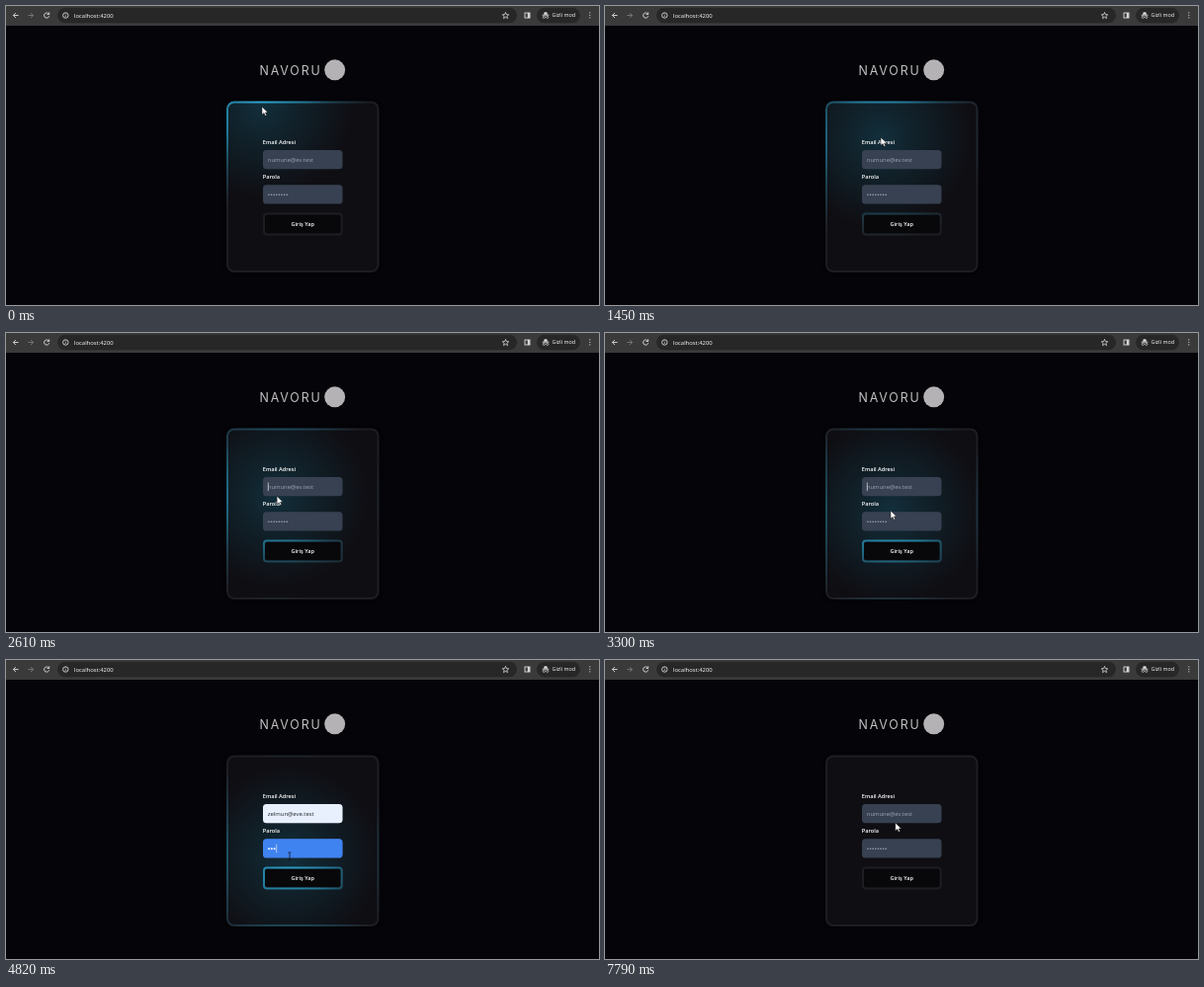
These frames come from a looping animation (600x303 px, 7820 ms). An HTML page:

```html
<!DOCTYPE html>
<html lang="tr">
<head>
<meta charset="utf-8">
<title>Giriş</title>
<style>
  html, body { margin: 0; width: 100%; height: 100%; overflow: hidden; background: #050409; }
  svg { display: block; width: 600px; height: 303px; }
  text { font-family: "Open Sans", "Noto Sans", sans-serif; font-size: 5.9px; fill: #fff; }
  .label { font-size: 5.6px; font-weight: 600; }
  .hint { fill: #9ca3af; }
  .brand { font-family: Inter, sans-serif; font-size: 12.4px; font-weight: 400; letter-spacing: 1.9px; fill: #c3c0c2; }
  .icon { fill: none; stroke: #dcdcdc; stroke-width: .9; }
  .field { fill: #374151; }
  .hover { fill: #3f83f1; }
  .edge { fill: none; stroke: #1e1d22; stroke-width: 2; }
  .lit { fill: none; stroke: url(#rim); stroke-width: 2; }
</style>
</head>
<body>
<svg viewBox="0 0 600 303">
  <defs>
    <radialGradient id="rim" gradientUnits="userSpaceOnUse" r="108">
      <stop offset="0" stop-color="#2cabd8"/>
      <stop offset=".4" stop-color="#2296bd" stop-opacity=".75"/>
      <stop offset=".65" stop-color="#1c7c9c" stop-opacity=".4"/>
      <stop offset="1" stop-color="#1c7c9c" stop-opacity="0"/>
    </radialGradient>
    <radialGradient id="haze" gradientUnits="userSpaceOnUse" r="92">
      <stop offset="0" stop-color="#155064" stop-opacity=".5"/>
      <stop offset=".5" stop-color="#144656" stop-opacity=".28"/>
      <stop offset="1" stop-color="#144656" stop-opacity="0"/>
    </radialGradient>
    <filter id="soft" x="-20%" y="-20%" width="140%" height="140%"><feGaussianBlur stdDeviation="2"/></filter>
  </defs>

  <rect width="600" height="303" fill="#050409"/>

  <g id="toolbar">
    <rect width="600" height="20" fill="#3a3a3b"/>
    <rect x="52" y="1.8" width="465" height="15.4" rx="7.7" fill="#272728"/>
    <rect x="537" y="1.8" width="44" height="15.4" rx="7.7" fill="#272728"/>
    <g class="icon">
      <path d="M12.6 9.5H7.4M9.9 7 7.4 9.5 9.9 12"/>
      <path d="M22.4 9.5H27.6M25.1 7 27.6 9.5 25.1 12" stroke="#7c7c7c"/>
      <path d="M43.3 8A2.6 2.6 0 1 0 43.7 10.2M43.7 6.4V8.5H41.6"/>
      <circle cx="60.3" cy="9.5" r="2.7"/>
      <path d="M60.3 9.2V11M60.3 7.7V8.4" stroke-width=".7"/>
      <path d="M505.5 6.4 506.4 8.6 508.7 8.8 506.9 10.3 507.5 12.6 505.5 11.3 503.5 12.6 504.1 10.3 502.3 8.8 504.6 8.6Z" stroke-width=".8"/>
      <rect x="525" y="7" width="5" height="5"/>
      <path d="M528.8 7V12" stroke-width="2"/>
      <path d="M542.6 9.2H549.4"/>
      <circle cx="544.3" cy="11.3" r="1.1" stroke-width=".7"/>
      <circle cx="547.7" cy="11.3" r="1.1" stroke-width=".7"/>
    </g>
    <path d="M544 8.8 544.7 6.2H547.3L548 8.8Z" fill="#dcdcdc"/>
    <path d="M590.8 6.8V12.4" stroke="#dcdcdc" stroke-width="1.2" stroke-linecap="round" stroke-dasharray="0 2.5"/>
    <text x="69" y="11.6">localhost:4200</text>
    <text x="552.5" y="11.4" font-size="5.4" style="font-size:5.4px">Gizli mod</text>
  </g>

  <g id="page">
    <text class="brand" x="256.5" y="69.6">NAVORU</text>
    <circle cx="332.7" cy="64.8" r="10.5" fill="#b5b2b5"/>

    <rect x="223" y="97" width="154" height="173" rx="8" fill="#000" opacity=".6" filter="url(#soft)"/>
    <rect x="224" y="97.5" width="152.5" height="171.5" rx="7" fill="#0f0e13"/>
    <rect class="glow" x="224" y="97.5" width="152.5" height="171.5" rx="7" fill="url(#haze)"/>
    <rect class="edge" x="224" y="97.5" width="152.5" height="171.5" rx="7"/>
    <rect class="glow lit" x="224" y="97.5" width="152.5" height="171.5" rx="7"/>

    <text class="label" x="259.8" y="140.2">Email Adresi</text>
    <rect class="field" x="260" y="146" width="80.5" height="19.3" rx="3.6"/>
    <rect class="hover" id="mailHover" x="260" y="146" width="80.5" height="19.3" rx="3.6"/>
    <rect id="filled" x="260" y="146" width="80.5" height="19.3" rx="3.6" fill="#e8f0fe"/>
    <text id="mail" x="264.8" y="157.7"></text>

    <text class="label" x="259.8" y="175.4">Parola</text>
    <rect class="field" x="260" y="181.2" width="80.5" height="19.3" rx="3.6"/>
    <rect class="hover" id="passHover" x="260" y="181.2" width="80.5" height="19.3" rx="3.6"/>
    <g id="dots"></g>
    <path id="caret" stroke="#e5e7eb" stroke-width=".7"/>

    <rect id="ring" x="258.7" y="208.3" width="83" height="25.4" rx="5" fill="none" stroke="#1d4c9c" stroke-width="2.4"/>
    <rect x="261" y="210.5" width="78.7" height="21" rx="3" fill="#08080b"/>
    <rect class="edge" x="261" y="210.5" width="78.7" height="21" rx="3"/>
    <rect class="glow lit" x="261" y="210.5" width="78.7" height="21" rx="3"/>
    <rect class="hover" id="btnHover" x="260" y="209.5" width="80.7" height="23" rx="4"/>
    <text class="label" x="300.2" y="223.1" text-anchor="middle">Giriş Yap</text>
  </g>

  <g id="cursor">
    <path id="arrow" d="M0 0V8.2L2 6.4 3.3 9.2 4.7 8.6 3.4 5.9H6Z" fill="#fff" stroke="#111" stroke-width=".5"/>
    <path id="beam" d="M-1.5-4H-.4L0-3.6.4-4H1.5M0-3.6V3.6M-1.5 4H-.4L0 3.6.4 4H1.5" fill="none" stroke="#10131a" stroke-width=".8"/>
    <path id="hand" d="M-.8.6Q0-.4.8.6V3.6L1.8 3.3 2.3 4 3.2 3.8 3.7 4.5 4.6 4.6V7.6L3.7 10H-.8L-3.2 6.6Q-3.4 5.4-2 5.7L-.8 6.8Z" fill="#fff" stroke="#111" stroke-width=".5"/>
  </g>
</svg>

<script>
const LOOP = 7820, LEAVE = 6390, RETURN = 7390;
const HINT = "numune@ev.test", MAIL = "zelmun@eve.test";
const $ = id => document.getElementById(id);
const show = (el, on) => { el.style.display = on ? "" : "none"; };
const clamp = v => Math.max(0, Math.min(1, v));
const fade = (t, from, to) => clamp((t - from) / 150) * (1 - clamp((t - to) / 150));
const within = (t, from, to) => t >= from && t < to;

// pointer keys: time, x, y
const path = [
  [0, 259, 102], [250, 315, 105], [450, 350, 135], [650, 362, 200], [790, 350, 246],
  [940, 334, 256], [1150, 262, 254], [1350, 246, 180], [1500, 298, 118], [1640, 338, 130],
  [1800, 308, 152], [1970, 288.5, 170], [2250, 287, 160], [2420, 285, 157], [2700, 271, 170],
  [2950, 279, 182], [3210, 289, 180], [3500, 289, 180], [3900, 287, 199], [5270, 287, 199],
  [5500, 316, 206], [5750, 327, 221], [6030, 301.5, 219], [6700, 301.5, 219], [6970, 293.8, 165],
  [LOOP, 293.8, 165]
];

function slope(i, axis) {
  const a = path[i - 1], b = path[i], c = path[i + 1];
  if (!a || !c) return 0;
  const still = (p, q) => p[1] === q[1] && p[2] === q[2];
  return still(a, b) || still(b, c) ? 0 : (c[axis] - a[axis]) / (c[0] - a[0]);
}

function pointer(t) {
  let i = 0;
  while (i < path.length - 2 && t >= path[i + 1][0]) i++;
  const a = path[i], b = path[i + 1], span = b[0] - a[0], u = (t - a[0]) / span;
  const ease = u * u * (3 - 2 * u);
  return [1, 2].map(k => a[k] + (b[k] - a[k]) * ease
    + span * u * (1 - u) * ((1 - u) * slope(i, k) - u * slope(i + 1, k)));
}

const dots = Array.from({ length: 8 }, () => {
  const dot = document.createElementNS("http://www.w3.org/2000/svg", "circle");
  dot.setAttribute("cy", 191.2);
  return $("dots").appendChild(dot);
});
const glows = document.querySelectorAll(".glow");

function drawMail(t, back) {
  const typed = t < 4050 || back ? 0 : t < 4450 ? Math.min(6, 1 + Math.floor((t - 4050) / 55)) : MAIL.length;
  const done = typed === MAIL.length;
  const mail = $("mail");
  mail.textContent = typed ? MAIL.slice(0, typed) : HINT;
  mail.style.fill = done ? "#24262b" : typed ? "#fff" : "#9ca3af";
  $("mailHover").style.opacity = back ? 0 : fade(t, 1720, 2440);
  show($("filled"), done);
  return typed;
}

function drawPass(t, back) {
  const typed = t < 4690 || back ? 0 : Math.min(6, 1 + Math.floor((t - 4690) / 65));
  dots.forEach((dot, i) => {
    show(dot, !typed || i < typed);
    dot.setAttribute("cx", 266 + i * (typed ? 2.8 : 2.6));
    dot.setAttribute("r", typed ? 1 : .8);
    dot.setAttribute("fill", typed ? "#fff" : "#a5abb5");
  });
  $("passHover").style.opacity = back ? 0 : fade(t, 3780, 5330);
  return typed;
}

function drawCaret(t, letters, count) {
  const inMail = within(t, 2200, 4500), inPass = within(t, 4600, 6060);
  const typing = within(t, 4050, 5030);
  show($("caret"), (inMail || inPass) && (typing || (t - 2200) % 1060 < 530));
  const x = inMail ? 265.3 + (letters ? $("mail").getComputedTextLength() : 0) : 265.3 + count * 2.8;
  $("caret").setAttribute("d", `M${x} ${inMail ? 151.5 : 186.7}v8.6`);
}

function draw(t) {
  const back = t >= RETURN;
  const [x, y] = pointer(t);
  show($("page"), t < LEAVE || back);
  glows.forEach(el => show(el, !back));
  for (const id of ["rim", "haze"]) {
    $(id).setAttribute("cx", x);
    $(id).setAttribute("cy", y);
  }
  const letters = drawMail(t, back);
  const count = drawPass(t, back);
  drawCaret(t, letters, count);
  $("btnHover").style.opacity = back ? 0 : fade(t, 5480, LEAVE);
  show($("ring"), within(t, 6060, LEAVE));

  const beam = within(t, 1720, 2480) || within(t, 3760, 5330);
  const hand = within(t, 5480, 6700);
  show($("beam"), beam);
  show($("hand"), hand);
  show($("arrow"), !beam && !hand);
  $("cursor").setAttribute("transform", `translate(${x} ${y})`);
}

const start = performance.now();
function tick() {
  draw((performance.now() - start) % LOOP);
  requestAnimationFrame(tick);
}
tick();
</script>
</body>
</html>
```
